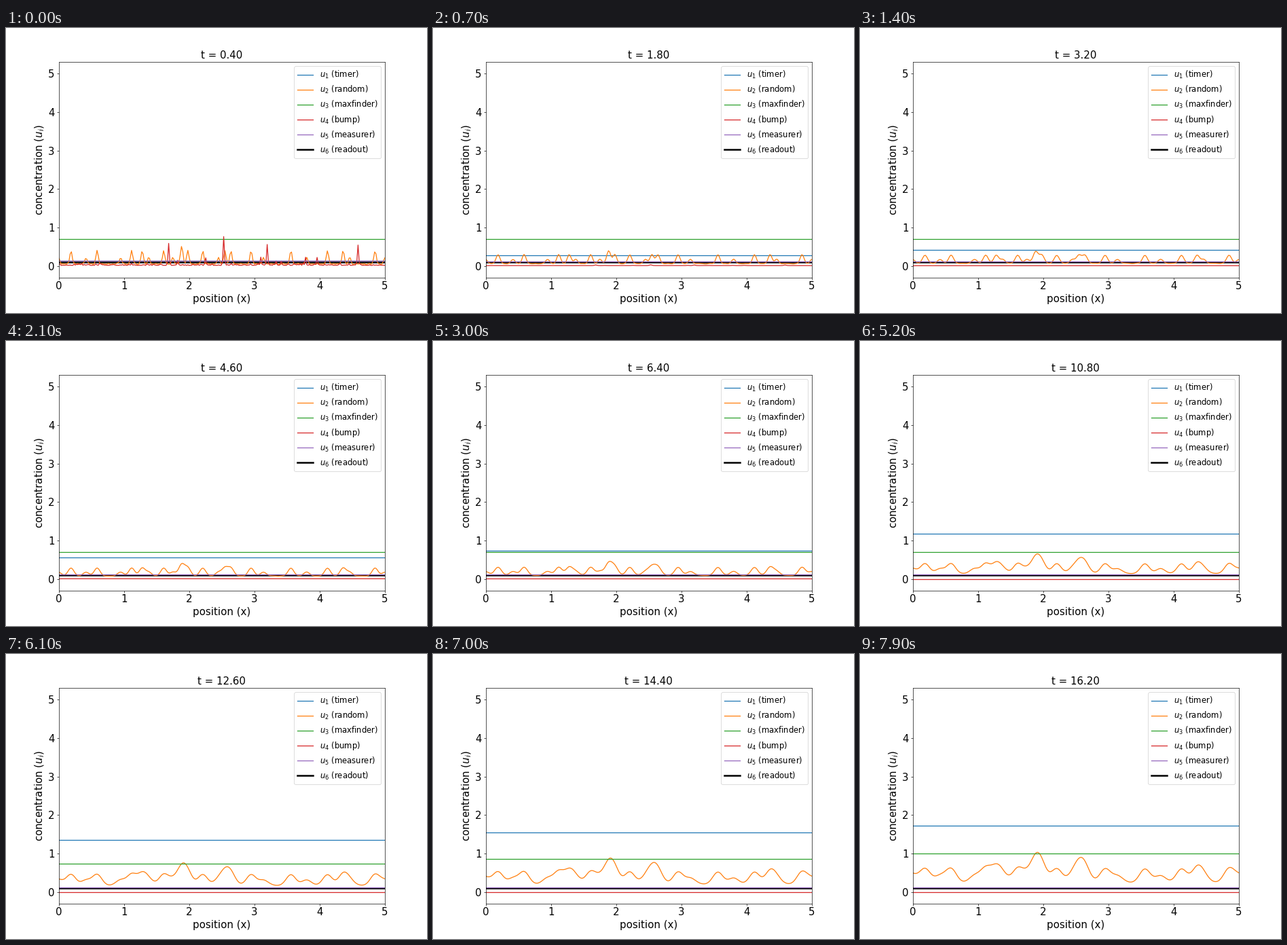
A matplotlib script for the animation above (8 s loop, 620 by 420 pixels).

```python
import numpy as np
import matplotlib.pyplot as plt
from matplotlib.animation import FuncAnimation

FRAMES, INTERVAL = 80, 100
T0, DT = 0.4, 0.2
LENGTH, CELLS = 5.0, 256
GROWTH, DIFFUSION, SEED_WIDTH = 0.1, 2e-4, 0.012
BACKGROUND, STRONG_MASS, WEAK_MASS = 0.047, 0.0146, 0.0072

# Places where the random field starts to grow
STRONG = np.array([.19, .59, 1.12, 1.28, 1.61, 1.88, 1.98, 2.21,
                   2.55, 2.64, 2.95, 3.56, 4.12, 4.36, 4.85])
WEAK = np.array([.0, .42, .95, 1.38, 1.75, 1.90, 2.45, 3.14, 3.80, 4.46])

rng = np.random.default_rng(4)
x = np.linspace(0, LENGTH, CELLS)
cells = np.arange(CELLS) * LENGTH / CELLS
cell_mass = BACKGROUND * LENGTH / CELLS * (1 + np.diff(rng.uniform(size=CELLS + 1)))
ripple = np.minimum(rng.exponential(0.013, CELLS), 0.08)

# Position and height of the first bumps: four tall ones, some small
bumps = [(1.68, .57), (2.535, .70), (3.20, .52), (4.59, .52)]
bumps += zip(rng.uniform(1.2, 4, 7), rng.uniform(.1, .25, 7))


def spread(points, start_width, t):
    """Periodic heat kernel from the points to x."""
    half = LENGTH / 2
    d = (x[:, None] - points + half) % LENGTH - half
    var = start_width ** 2 + 2 * DIFFUSION * t
    return np.exp(-d ** 2 / (2 * var)) / np.sqrt(2 * np.pi * var)


def random_field(t):
    seeds = (STRONG_MASS * spread(STRONG, SEED_WIDTH, t).sum(axis=1)
             + WEAK_MASS * spread(WEAK, SEED_WIDTH, t).sum(axis=1))
    return np.exp(GROWTH * t) * (seeds + spread(cells, 0, t) @ cell_mass)


def bump_field(t):
    age = t - T0
    start = 0.009
    width = np.sqrt(start ** 2 + 2e-4 * age)
    y = 0.012 * np.exp(-0.4 * age) + ripple * np.exp(-4 * age)
    for pos, height in bumps:
        near = x[np.abs(x - pos).argmin()]
        shape = np.exp(-(x - near) ** 2 / (2 * width ** 2))
        y = y + height * np.exp(-2 * age) * start / width * shape
    return y


def levels(t):
    timer = 0.1 + 0.1 * t
    field = random_field(t)
    highest = max(0.7, field.max() - 0.03) if t > 8 else 0.7
    measurer = 0.112 + 0.013 * np.exp(-(t - T0))
    return timer, field, highest, bump_field(t), measurer, 0.1


plt.rcParams.update({"font.family": "DejaVu Sans", "font.size": 18})
fig, ax = plt.subplots(figsize=(620 / 60, 420 / 60), dpi=60)
fig.subplots_adjust(left=0.125, right=0.9, bottom=0.125, top=0.88)
ax.set(xlim=(0, LENGTH), ylim=(-0.3, 5.3))
ax.set_xlabel("position (x)")
ax.set_ylabel("concentration ($u_i$)")
title = ax.set_title("", fontsize=18)

names = ["timer", "random", "maxfinder", "bump", "measurer", "readout"]
lines = [ax.plot([], [], lw=1.5, label=f"$u_{i}$ ({name})")[0]
         for i, name in enumerate(names, 1)]
lines[-1].set(color="black", linewidth=3, zorder=1.9)
ax.legend(handles=lines, loc="upper right", fontsize=14)


def update(i):
    t = T0 + DT * i
    for line, y in zip(lines, levels(t)):
        line.set_data(x, np.broadcast_to(y, x.shape))
    title.set_text(f"t = {t:.2f}")
    return lines + [title]


anim = FuncAnimation(fig, update, frames=FRAMES, interval=INTERVAL,
                     repeat=True, repeat_delay=0, blit=False)
plt.show()
```
